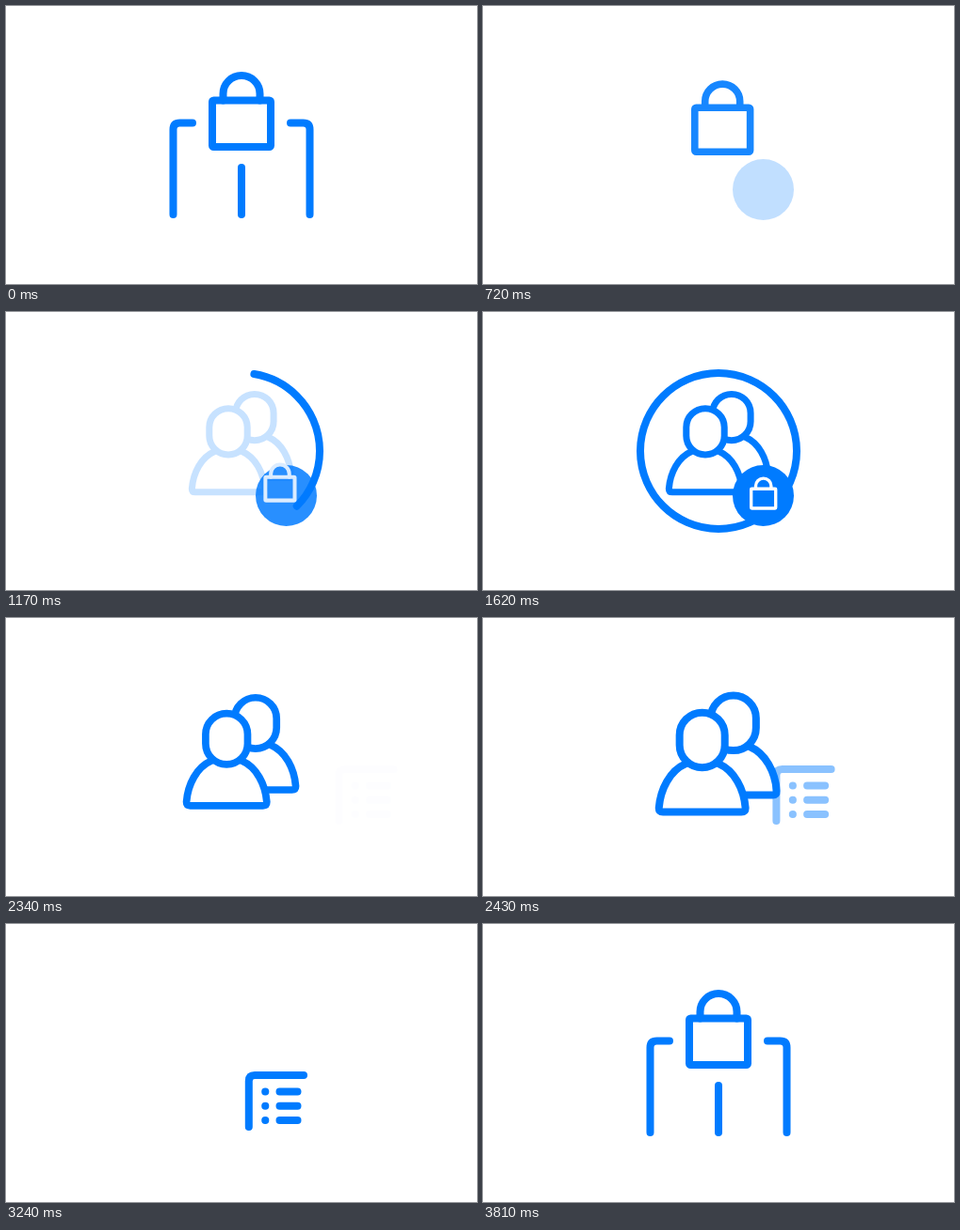
Recreate the animation shown at these times as an HTML page. Size 500 by 296 pixels, loop 3840 ms.

```html
<!DOCTYPE html>
<html lang="en">
<head>
<meta charset="utf-8">
<title>Privacy icons</title>
<style>
  html, body { margin: 0; width: 100%; height: 100%; overflow: hidden; background: #fff; }
  svg { display: block; width: 100vw; height: 100vh; }
  .line { fill: none; stroke: #007bff; stroke-width: 8; stroke-linecap: round; stroke-linejoin: round; }
  .solid { fill: #fff; }
</style>
</head>
<body>
<svg viewBox="0 0 500 296">
  <defs>
    <g id="person">
      <path d="M-19 27.5C-37.5 35.5 -48.5 57 -50.2 79Q-50.2 83.7 -45.5 83.7H45.5Q50.2 83.7 50.2 79C48.5 57 37.5 35.5 19 27.5"/>
      <rect x="-26.25" y="-32" width="52.5" height="64" rx="26.25"/>
    </g>
  </defs>

  <!-- starts behind the badge and runs counterclockwise -->
  <path id="ring" class="line" pathLength="100" d="M308.7 206.7A83 83 0 1 0 191.3 89.3A83 83 0 1 0 308.7 206.7"/>

  <g id="people" class="line solid">
    <use href="#person" x="36.2" y="-19.8"/>
    <use href="#person"/>
  </g>

  <circle id="badge" cx="297.5" cy="195.5" r="32.5" fill="#007bff"/>

  <g id="list">
    <rect id="panel" x="258" y="161" width="68" height="64" fill="#fff"/>
    <path id="corner" class="line"/>
    <path id="rows" class="line" d="M275.2 178.5h.1M290.5 178.5h19M275.2 193.8h.1M290.5 193.8h19M275.2 209h.1M290.5 209h19"/>
  </g>

  <g id="posts" class="line">
    <path pathLength="100" d="M250 222V172"/>
    <path pathLength="100" d="M322.5 222V131.5Q322.5 124.5 315.5 124.5H302"/>
  </g>

  <g id="lock" class="line">
    <path d="M-19.5 -24.5V-31.5A19.5 19.5 0 0 1 19.5 -31.5V-24.5"/>
    <rect x="-31" y="-24.5" width="62" height="49.5" rx="1.5"/>
  </g>
</svg>

<script>
const LOOP = 3840;
const parts = {};
for (const id of ["ring", "people", "badge", "list", "panel", "corner", "rows", "posts", "lock"])
  parts[id] = document.getElementById(id);

const mix = (a, b, p) => a + (b - a) * p;
const span = (t, from, to) => Math.min(1, Math.max(0, (t - from) / (to - from)));
const easeOut = p => 1 - (1 - p) ** 2;
const easeInOut = p => p < 0.5 ? 2 * p * p : 1 - 2 * (1 - p) ** 2;

function show(el, opacity) {
  el.style.display = opacity > 0 ? "" : "none";
  el.style.opacity = opacity;
}

function trim(el, p) {
  el.style.display = p > 0 ? "" : "none";
  el.style.strokeDasharray = p < 1 ? `${100 * p} 200` : "none";
}

function place(el, x, y, scale = 1) {
  el.setAttribute("transform", `translate(${x} ${y}) scale(${scale})`);
}

function drawLock(t) {
  const shrink = easeInOut(span(t, 540, 1400));
  const enter = easeOut(span(t, 3420, 3810));
  const back = t >= 3240;
  const p = back ? 0 : shrink;
  place(parts.lock, mix(250, 297.7, p), mix(125, 198.5, p) + (back ? 12 * (1 - enter) : 0), mix(1, 0.42, p));
  parts.lock.style.stroke = `rgb(${255 * p},${mix(123, 255, p)},255)`;
  show(parts.lock, back ? enter : t < 2340 ? 1 : 0);
}

function drawPeople(t) {
  const p = t < 2340 ? 0 : mix(0.34, 1, easeOut(span(t, 2340, 2700)));
  const scale = mix(0.77, 1, p);
  place(parts.people, mix(236, 230.75, p), mix(127.3, 131.5, p), scale);
  parts.people.style.strokeWidth = mix(7, 8, Math.min(1, p * 2)) / scale;
  show(parts.people, t < 3240 ? span(t, 1080, 1500) : 0);
}

function drawBadge(t) {
  const on = t < 2340;
  show(parts.badge, on ? span(t, 540, 1290) : 0);
  trim(parts.ring, on ? span(t, 930, 1620) : 0);
}

// The list's outline later becomes the left post.
function drawList(t) {
  const start = t < 570;
  const p = start ? 1 : easeInOut(span(t, 3300, 3780));
  const x = mix(257.8, 177.5, p), top = mix(161, 124.5, p), r = mix(6.2, 7, p);
  parts.corner.setAttribute("d",
    `M${x} ${mix(216, 222, p)}V${top + r}Q${x} ${top} ${x + r} ${top}H${mix(316, 198, p)}`);
  place(parts.list, start ? 0 : 96 * (1 - easeOut(span(t, 2340, 2700))), 0);
  show(parts.list, start ? 1 : span(t, 2340, 2540));
  show(parts.panel, !start && t < 3240 ? 1 : 0);
  show(parts.rows, start ? 0 : 1 - span(t, 3300, 3450));
}

function drawPosts(t) {
  const p = t < 570 ? 1 : easeOut(span(t, 3360, 3810));
  for (const post of parts.posts.children) trim(post, p);
}

const begin = performance.now();
function frame() {
  const t = (performance.now() - begin) % LOOP;
  for (const draw of [drawLock, drawPeople, drawBadge, drawList, drawPosts]) draw(t);
  requestAnimationFrame(frame);
}
frame();
</script>
</body>
</html>
```
